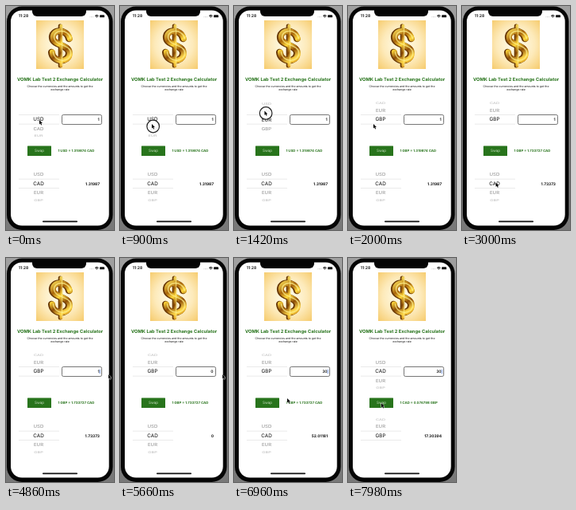
These frames come from a looping animation (136x281 px, 8 s). An HTML page with a canvas:

```html
<!DOCTYPE html>
<html lang="en">
<head>
<meta charset="utf-8">
<title>Exchange calculator</title>
<style>
html, body { margin: 0; width: 100%; height: 100%; overflow: hidden; background: #8c8c8c; }
canvas { display: block; width: 136px; height: 281px; }
</style>
</head>
<body>
<canvas id="stage"></canvas>
<script>
const W = 136, H = 281, LOOP = 8000;
const GREEN = '#28741c', INK = '#111';
const CODES = ['USD', 'CAD', 'EUR', 'GBP'];
const canvas = document.getElementById('stage');
const ctx = canvas.getContext('2d');
const ratio = window.devicePixelRatio || 1;
canvas.width = W * ratio;
canvas.height = H * ratio;
ctx.scale(ratio, ratio);
ctx.textRendering = 'geometricPrecision';

// Pointer stops: time, x, y
const POINTER = [
  [0, 42, 143], [80, 42, 143], [480, 38, 146], [880, 40, 148],
  [1000, 40, 148], [1600, 38, 127], [1760, 38, 127], [2000, 32, 148],
  [2220, 32, 148], [2760, 42, 222], [2960, 42, 222], [3740, 116, 144],
  [3840, 116, 144], [4400, 129, 146], [6440, 129, 146], [6900, 67, 176],
  [6970, 67, 176], [7240, 42, 182], [8000, 42, 182]
];

const clamp = v => Math.max(0, Math.min(1, v));
const smooth = v => v * v * (3 - 2 * v);
const ease = (t, a, b) => smooth(clamp((t - a) / (b - a)));

function track(stops, t) {
  let i = 0;
  while (i < stops.length - 2 && t >= stops[i + 1][0]) i++;
  const [a, ax, ay] = stops[i], [b, bx, by] = stops[i + 1];
  const k = ease(t, a, b);
  return [ax + (bx - ax) * k, ay + (by - ay) * k];
}

function box(x, y, w, h, r, fill) {
  ctx.beginPath();
  ctx.roundRect(x, y, w, h, r);
  ctx.fillStyle = fill;
  ctx.fill();
}

function label(text, x, y, size, { weight = 400, color = INK, align = 'center' } = {}) {
  ctx.font = `${weight} ${size}px Inter, "Open Sans", sans-serif`;
  ctx.textAlign = align;
  ctx.textBaseline = 'middle';
  ctx.fillStyle = color;
  ctx.fillText(text, x, y);
}

function drawPhone() {
  const wall = ctx.createLinearGradient(0, 0, 0, H);
  wall.addColorStop(0, '#a0a0a0');
  wall.addColorStop(1, '#787878');
  ctx.fillStyle = wall;
  ctx.fillRect(0, 0, W, H);
  box(1, 0.5, 133.5, 280.5, 19, '#050505');
  box(6, 5.5, 123.7, 270, 14, '#fff');
  box(33, 3, 68, 10, [0, 0, 6, 6], '#050505');
  box(46, 269.5, 44, 1.7, 0.8, '#111');
}

function drawStatus() {
  label('11:28', 22, 12.9, 5.1, { weight: 600 });
  for (let i = 0; i < 4; i++) box(105.5 + i * 1.4, 13.4, 0.8, 0.8, 0.4, '#888');
  ctx.strokeStyle = INK;
  ctx.lineWidth = 1;
  for (const r of [0.8, 2, 3.2]) {
    ctx.beginPath();
    ctx.arc(114.3, 14.7, r, -Math.PI * 0.75, -Math.PI * 0.25);
    ctx.stroke();
  }
  box(118, 11.3, 6, 3, 0.9, INK);
}

function drawDollar() {
  const glow = ctx.createRadialGradient(68, 48, 5, 68, 48, 43);
  glow.addColorStop(0, '#fffbe8');
  glow.addColorStop(0.5, '#fdeaba');
  glow.addColorStop(1, '#f6cb6c');
  box(38, 18, 60, 61, 0, glow);

  const gold = ctx.createLinearGradient(56, 30, 82, 70);
  gold.addColorStop(0, '#ffe45a');
  gold.addColorStop(0.28, '#a9650a');
  gold.addColorStop(0.45, '#ffd83c');
  gold.addColorStop(0.65, '#8e4d06');
  gold.addColorStop(0.85, '#ffd94a');
  gold.addColorStop(1, '#d08a14');

  const sign = new Path2D('M80 41 C77 28 58 29 59 40 C60 50 80 48 80 59 C80 72 59 71 58 58');
  const bar = new Path2D('M69 25 V75');
  ctx.lineCap = 'round';
  ctx.lineJoin = 'round';
  const pass = (color, thick, thin, dx) => {
    ctx.save();
    ctx.translate(dx, 0);
    ctx.strokeStyle = color;
    ctx.lineWidth = thin;
    ctx.stroke(bar);
    ctx.lineWidth = thick;
    ctx.stroke(sign);
    ctx.restore();
  };
  pass('#6b3a06', 8.5, 5, -0.8);
  pass(gold, 7, 3.8, 0.4);
  pass('rgba(255,242,140,.75)', 1.5, 1, 1.6);
  ctx.lineCap = 'butt';
}

function drawPicker(y, scroll) {
  ctx.fillStyle = '#dcdcdc';
  ctx.fillRect(16, y - 6, 51, 0.6);
  ctx.fillRect(16, y + 5.5, 51, 0.6);
  CODES.forEach((code, i) => {
    const angle = (i - scroll) * 0.47;
    if (Math.abs(angle) > 1.2) return;
    const near = clamp(1 - Math.abs(i - scroll) * 1.6);
    const alpha = near > 0 ? 0.5 + near * 0.45 : 0.5 * Math.cos(angle);
    ctx.save();
    ctx.translate(41, y + 25.3 * Math.sin(angle));
    ctx.scale(0.75 + 0.25 * Math.cos(angle), Math.cos(angle));
    label(code, 0, 0.3, 6.3, { color: `rgba(0,0,0,${alpha})` });
    ctx.restore();
  });
}

function drawField(text, caret) {
  ctx.beginPath();
  ctx.roundRect(70.5, 136.5, 50, 12, 1.8);
  ctx.strokeStyle = '#555';
  ctx.lineWidth = 0.8;
  ctx.stroke();
  label(text, 117.5, 142.7, 4.9, { weight: 600, align: 'right' });
  if (caret) {
    ctx.fillStyle = '#3568d4';
    ctx.fillRect(117.8, 139.8, 0.7, 5.4);
  }
}

function drawPointer(x, y, pressed) {
  if (pressed) {
    ctx.beginPath();
    ctx.arc(x + 1.7, y + 3, 7.8, 0, Math.PI * 2);
    ctx.fillStyle = 'rgba(255,255,255,.75)';
    ctx.fill();
    ctx.strokeStyle = '#222';
    ctx.lineWidth = 1.2;
    ctx.stroke();
  }
  ctx.save();
  ctx.translate(x, y);
  ctx.scale(0.85, 0.85);
  ctx.beginPath();
  ctx.moveTo(0, 0);
  for (const [px, py] of [[0, 6.4], [1.5, 5.1], [2.6, 7.5], [3.7, 7], [2.7, 4.7], [4.6, 4.6]]) ctx.lineTo(px, py);
  ctx.closePath();
  ctx.lineJoin = 'round';
  ctx.lineWidth = 1;
  ctx.strokeStyle = '#fff';
  ctx.stroke();
  ctx.fillStyle = '#000';
  ctx.fill();
  ctx.restore();
}

function amountAt(t) {
  if (t < 4900) return '1';
  if (t < 5040) return '';
  if (t < 5820) return '0';
  return t < 6200 ? '3' : '30';
}

function resultAt(t) {
  if (t < 2040) return '1.31987';
  if (t < 4900) return '1.73373';
  if (t < 5820) return '0';
  if (t < 6200) return '5.20118';
  return t < 7400 ? '52.01181' : '17.30394';
}

function rateAt(t) {
  if (t < 1900) return '1 USD = 1.319874 CAD';
  if (t < 2040) return '1 GBP = 1.319874 CAD';
  return t < 7400 ? '1 GBP = 1.733727 CAD' : '1 CAD = 0.576798 GBP';
}

function draw(t) {
  drawPhone();
  drawStatus();
  drawDollar();
  label('VOMK Lab Test 2 Exchange Calculator', 68, 91.8, 5.8, { weight: 700, color: GREEN });
  label('Choose the currencies and the amounts to get the', 68, 100.5, 3.5);
  label('exchange rate', 68, 105, 3.5);

  const swap = ease(t, 7400, 7860) * 2;
  drawPicker(142.3, ease(t, 1000, 1700) * 3 - swap);
  drawPicker(222.8, 1 + swap);

  const typing = t > 3780 && t < 5560 || t > 5800;
  drawField(amountAt(t), typing && t % 1000 > 450);

  box(27, 175.5, 30, 12.5, 0.5, GREEN);
  const held = t > 7260 && t < 7400;
  label('Swap', 42, 182, 4.6, { color: held ? '#8fb889' : '#c8dfc1' });
  label(rateAt(t), 65.5, 182, 4.3, { weight: 700, color: GREEN, align: 'left' });
  label(resultAt(t), 118, 223.2, 4.85, { weight: 700, align: 'right' });

  const [x, y] = track(POINTER, t);
  drawPointer(x, y, t >= 860 && t < 1640);
}

function tick() {
  draw(performance.now() % LOOP);
  requestAnimationFrame(tick);
}
tick();
</script>
</body>
</html>
```
